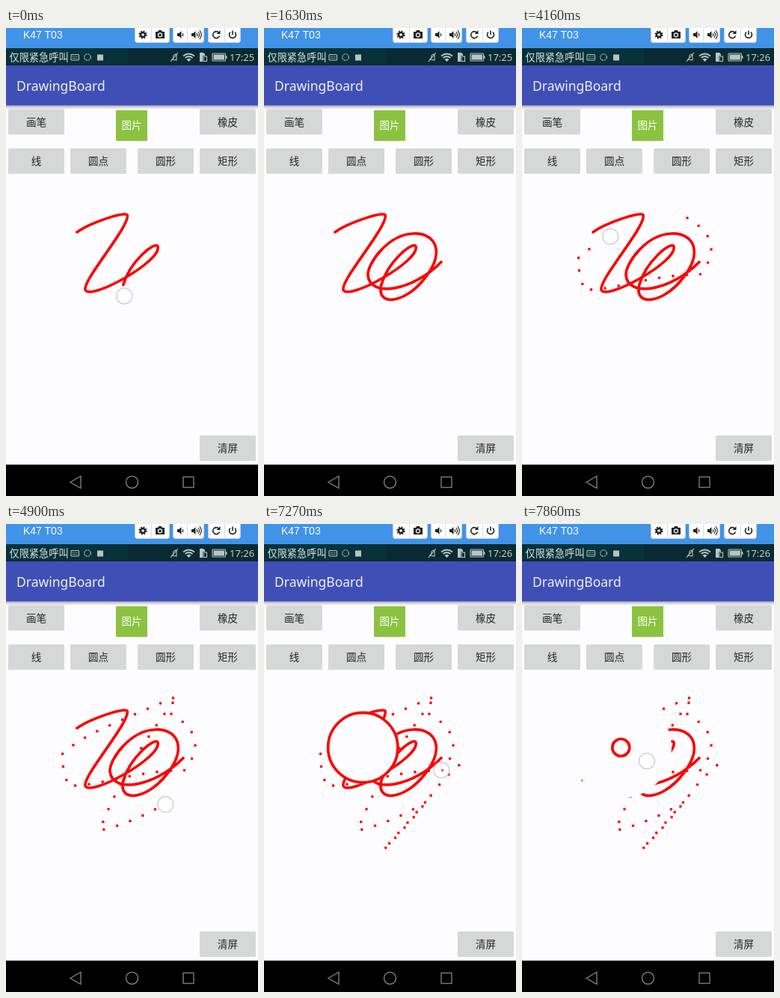
Write an HTML page that moves like this. It is 337 px wide and 626 px high and loops after 8 s.

```html
<!DOCTYPE html>
<html lang="zh-CN">
<head>
<meta charset="utf-8">
<title>DrawingBoard</title>
<style>
html, body { margin: 0; width: 100%; height: 100%; overflow: hidden; background: #fdfdff; }
svg { display: block; width: 337px; height: 626px; }
text { font-family: "Noto Sans", "Noto Sans CJK SC", "Noto Sans CJK", sans-serif; }
.key rect { fill: #d6d7d7; }
.key.down rect { fill: #c4c5c5; }
.key text { font-size: 13.5px; font-weight: 500; fill: #262626; text-anchor: middle; }
.tool { fill: none; stroke: #222; stroke-width: 1.6; }
.tool .solid { fill: #222; stroke: none; }
.status { fill: none; stroke: #b9c4c6; stroke-width: 1.1; }
.status .solid { fill: #b9c4c6; stroke: none; }
.ink { fill: none; stroke: #fa0505; stroke-width: 3.7; stroke-linecap: round; stroke-linejoin: round; }
</style>
</head>
<body>
<svg viewBox="0 0 337 626">
  <defs>
    <linearGradient id="shade" x2="0" y2="1">
      <stop stop-color="#a9a9b4"/><stop offset="1" stop-color="#fdfdff"/>
    </linearGradient>
  </defs>
  <rect width="337" height="626" fill="#fdfdff"/>

  <!-- toolbar -->
  <rect width="337" height="27" fill="#4193e8"/>
  <text x="23" y="14" fill="#fff" style="font:14px 'Liberation Sans',sans-serif">K47 T03</text>
  <g fill="#fff" stroke="#c9d3df" stroke-width=".8">
    <rect x="172.500" y="-5" width="46" height="24.500" rx="3"/>
    <rect x="223.500" y="-5" width="41" height="24.500" rx="3"/>
    <rect x="270.500" y="-5" width="43" height="24.500" rx="3"/>
    <path d="M194.500 0V19M242.500 0V19M292.500 0V19"/>
  </g>
  <g class="tool">
    <circle cx="183" cy="9" r="3" stroke-width="2.4"/>
    <circle cx="183" cy="9" r="4.800" stroke-dasharray="2 1.770"/>
    <path class="solid" d="M200 5h3l1-2h4l1 2h3v9h-12z"/>
    <circle cx="206" cy="9.300" r="2.500" stroke="#fff" stroke-width="1.200"/>
    <path class="solid" d="M229 7h2.500l3-3v10l-3-3H229zM248 7h2.500l3-3v10l-3-3H248z"/>
    <path d="M236 7q1.500 2 0 4M255 7q1.500 2 0 4M257 5q3 4 0 8M259 3q4.500 6 0 12" stroke-width="1.200"/>
    <path d="M284.500 6A4.500 4.500 0 1 0 285.500 10.500"/>
    <path class="solid" d="M286.500 3v5h-5z"/>
    <path d="M300 5.500A4.500 4.500 0 1 0 306 5.500M303 3.500V9"/>
  </g>

  <!-- status bar -->
  <rect y="27" width="337" height="24" fill="#0a2a31"/>
  <rect y="27" width="163" height="21" fill="#07323a"/>
  <text x="4.500" y="44" font-size="13.2" fill="#dfe6e7">仅限紧急呼叫</text>
  <g class="status">
    <rect x="87" y="35.500" width="10.500" height="7.500" rx="1"/>
    <path d="M89 38h7M89 40.500h7" stroke-dasharray="1.500 1"/>
    <circle cx="109" cy="39" r="4.300" stroke-dasharray="2.500 .9"/>
    <rect class="solid" x="122" y="35.500" width="8" height="8"/>
    <path d="M222 42q2-1 2-4t4-3v8zM220 45l10-12"/>
    <path d="M237 37.500q7.500-6 15 0M239.500 40q5-4 10 0" stroke-width="1.700"/>
    <path class="solid" d="M241.500 42q3-2.500 6 0l-3 3zM259 33h5l2 2v2h-3v8h-4z"/>
    <rect x="264" y="38" width="4.500" height="6.500"/>
    <rect x="276" y="34" width="17.500" height="10" rx="1"/>
    <rect class="solid" x="277.500" y="35.500" width="14.500" height="7"/>
    <path d="M294.500 37v4" stroke-width="1.800"/>
  </g>
  <text id="clock" x="299" y="44" font-size="13" fill="#c5cecf">17:25</text>

  <!-- app bar -->
  <rect y="103" width="337" height="6" fill="url(#shade)"/>
  <rect y="50" width="337" height="53.500" fill="#3f4fb6"/>
  <text x="14" y="84.300" font-size="17.500" font-weight="500" fill="#f0f1fa">DrawingBoard</text>

  <g id="keys"></g>
  <rect x="147" y="110" width="42" height="41" fill="#8bc340"/>
  <text x="168" y="135" font-size="13.500" fill="#fff" text-anchor="middle">图片</text>

  <!-- board -->
  <path id="line" class="ink"/>
  <path id="dots" class="ink"/>
  <circle id="hole" cx="132.300" cy="299" fill="#fdfdff"/>
  <circle id="ring" cx="132.300" cy="299" class="ink"/>

  <!-- navigation -->
  <rect y="584" width="337" height="42" fill="#000"/>
  <g fill="none" stroke="#7d7d7d" stroke-width="1.400">
    <path d="M86 607.500L100 599.500V615.500Z"/>
    <circle cx="168.500" cy="607.500" r="8"/>
    <rect x="237" y="600.500" width="14" height="14"/>
  </g>
  <circle id="touch" r="10.500" fill="#fff" fill-opacity=".35" stroke="#c9c3d8" stroke-opacity=".8" stroke-width="1.500"/>
</svg>
<script>
const $ = id => document.getElementById(id);
const NS = 'http://www.w3.org/2000/svg';
const LOOP = 8000, STEP = 148.3;  // the screen refreshes once per STEP
const LEAD = 16;                  // the finger runs ahead of the ink
const GAP = 18.5;                 // distance between dots

function makePath(d) {
  const p = document.createElementNS(NS, 'path');
  p.setAttribute('d', d);
  return p;
}

function addKey(label, x, y) {
  const g = document.createElementNS(NS, 'g');
  g.setAttribute('class', 'key');
  g.innerHTML = `<rect x="${x}" y="${y}" width="75" height="34" rx="1.5"/>
    <text x="${x + 37.5}" y="${y + 22.3}">${label}</text>`;
  $('keys').append(g);
  return g;
}
const columns = [3, 86, 176, 259];
const [, dotKey, circleKey] = ['线', '圆点', '圆形', '矩形'].map((s, i) => addKey(s, columns[i], 161));
addKey('画笔', 3, 108.5);
addKey('橡皮', 259, 108.5);
addKey('清屏', 259, 545);

// Pen stroke: the part already drawn, then the rest
const begun = 'M95 273C112 261 158 245 162 250C167 264 103 336 106 350' +
  'C111 366 209 312 203 292C199 285 166 312 157 343';
const rest = 'C149 373 188 369 214 336C243 300 230 274 200 275C166 276 138 315 139 331' +
  'C142 361 199 352 237 313';
const line = $('line');
line.setAttribute('d', begun + rest);
const begunLen = makePath(begun).getTotalLength();
const lineLen = line.getTotalLength();

// Dot trail: a sweep around the scribble
const trail = makePath('M221 254Q275 285 238 330Q200 328 120 347L83 351L73 310Q92 290 137 270' +
  'T230 230Q160 320 125 410Q170 400 216 372Q200 390 159 437Q200 395 224 362T281 308');
const trailLen = trail.getTotalLength();

const clamp = v => Math.max(0, Math.min(1, v));
const lineAt = n => begunLen + (lineLen - begunLen) * clamp(n / 5);
const trailAt = n => trailLen * clamp((n - 24) / 12);
const onPath = (path, len) => { const p = path.getPointAtLength(len); return [p.x, p.y]; };

// Circle drag: out quickly, back in slowly
const swing = n => Math.sin(Math.PI * clamp((n - 47) / 6) ** 0.95) ** 4;
const radius = n => 11.5 + 55 * swing(n);

function finger(n) {
  const during = (from, to) => n >= from && n < to;
  if (n < 6) return onPath(line, lineAt(n) + LEAD);
  if (during(18, 21)) return [124, 185];
  if (during(26, 37)) return onPath(trail, trailAt(n));
  if (during(45, 47)) return [219, 187];
  if (n >= 47) return [167 + 110 * swing(n), 317 + 19 * swing(n)];
}

function dotsUpTo(len) {
  let d = '';
  for (let s = 0; s <= len; s += GAP) d += `M${onPath(trail, s)}h.01`;
  return d;
}

function show(n) {
  line.setAttribute('stroke-dasharray', `${lineAt(n)} 9999`);
  $('dots').setAttribute('d', n < 26 ? '' : dotsUpTo(trailAt(n) - LEAD));
  $('clock').textContent = n < 26 ? '17:25' : '17:26';
  dotKey.classList.toggle('down', n === 19 || n === 20);
  circleKey.classList.toggle('down', n === 46);

  const round = n >= 47 ? '' : 'none';
  $('ring').style.display = $('hole').style.display = round;
  $('ring').setAttribute('r', radius(n));
  $('hole').setAttribute('r', radius(Math.min(n, 50)) + 1.5);

  const at = finger(n);
  $('touch').style.display = at ? '' : 'none';
  if (at) $('touch').setAttribute('transform', `translate(${at})`);
}

let last = -1;
const began = performance.now();
function tick() {
  const t = (performance.now() - began) % LOOP;
  const n = Math.min(53, Math.floor((t + 10) / STEP));
  if (n !== last) show(last = n);
  requestAnimationFrame(tick);
}
tick();
</script>
</body>
</html>
```
